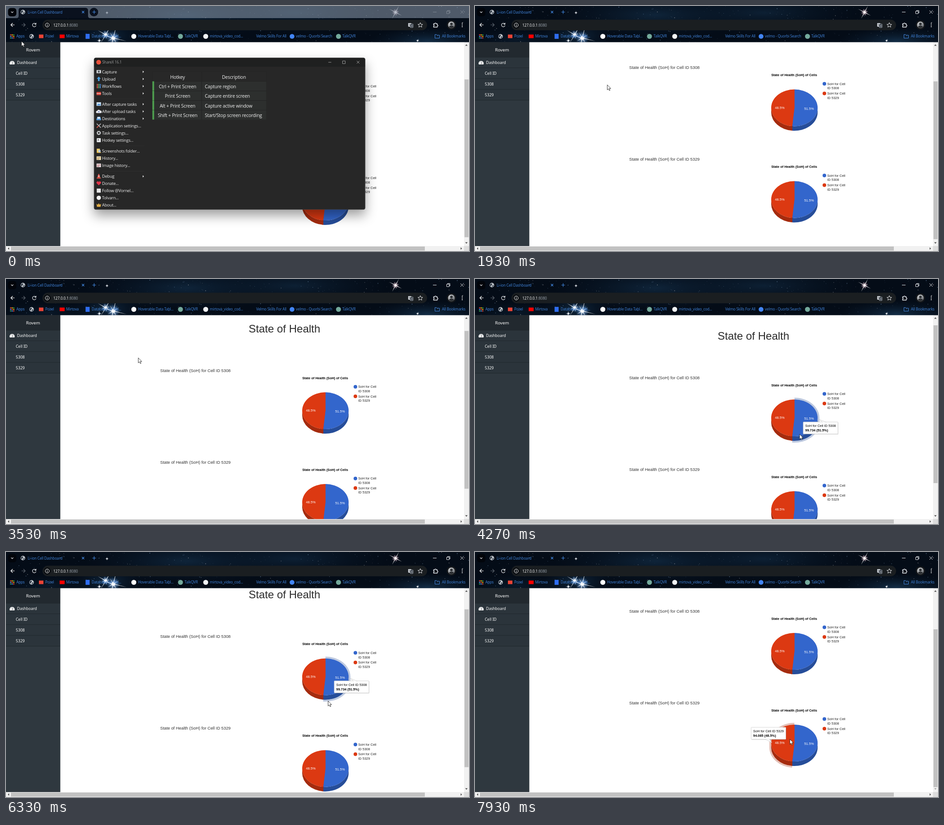
Write an HTML page that moves like this. It is 1027x545 px and loops after 8 s.

```html
<!DOCTYPE html>
<html lang="en">
<head>
<meta charset="utf-8">
<title>Li-ion Cell Dashboard</title>
<style>
html, body { margin: 0; width: 100%; height: 100%; overflow: hidden; background: #fff; }
svg { display: block; width: 100%; height: 100%; }
text { white-space: pre; }
.ui { font-family: "Open Sans", "Noto Sans", sans-serif; letter-spacing: -.02em; }
.nav { font-family: "Noto Sans", sans-serif; font-weight: 500; fill: #fff; }
.doc { font-family: "Liberation Sans", Arial, sans-serif; fill: #222; }
.mid { text-anchor: middle; }
.bold { font-weight: bold; }
.line { fill: none; stroke: #e8eaed; stroke-width: 1.2; }
#win { filter: drop-shadow(0 13px 13px rgba(0,0,0,.38)); }
</style>
</head>
<body>
<svg id="stage" viewBox="0 0 1027 545" preserveAspectRatio="none"></svg>
<script>
const rect = (x, y, w, h, fill, more = "") =>
  `<rect x="${x}" y="${y}" width="${w}" height="${h}" fill="${fill}" ${more}/>`;
const disc = (x, y, r, fill, more = "") =>
  `<circle cx="${x}" cy="${y}" r="${r}" fill="${fill}" ${more}/>`;
const path = (d, fill, more = "") => `<path d="${d}" fill="${fill}" ${more}/>`;
const line = (d, more = "") => `<path class="line" d="${d}" ${more}/>`;
// y is the middle of the capitals
const text = (x, y, s, size, cls, more = "") =>
  `<text x="${x}" y="${y}" dy=".36em" font-size="${size}" class="${cls}" ${more}>${s}</text>`;
const at = (x, y, s) => `<g transform="translate(${x} ${y})">${s}</g>`;

let seed = 11;
const rand = () => (seed = (seed * 16807) % 2147483647) / 2147483647;

function sky() {
  let s = rect(0, 0, 1027, 81, "#040c17");
  for (const [x, y, rx, ry, o] of [[400, 20, 230, 50, .6], [640, 15, 210, 45, .5],
    [935, 78, 130, 30, .8], [225, 66, 80, 34, .7], [90, 75, 110, 25, .3]])
    s += `<ellipse cx="${x}" cy="${y}" rx="${rx}" ry="${ry}" fill="url(#haze)" opacity="${o}"/>`;
  for (let i = 0; i < 420; i++) {
    const r = .3 + .6 * rand() ** 3;
    s += disc((rand() * 1027).toFixed(1), (rand() * 81).toFixed(1), r.toFixed(2),
      rand() < .6 ? "#8fb2d8" : "#d6cfcf", `opacity="${(.25 + .55 * rand()).toFixed(2)}"`);
  }
  const flare = (x, y, r, glow, turn) => {
    let rays = "";
    for (let i = 0; i < 8; i++) {
      const len = r * (i % 2 ? .5 : 1);
      rays += path(`M-.8 0L0 ${-len} .8 0Z`, "#fff", `transform="rotate(${turn + i * 45})"`);
    }
    return at(x, y, disc(0, 0, r * .5, `url(#${glow})`) + rays + disc(0, 0, r * .13, "#fff"));
  };
  return s + flare(238, 71, 30, "cold", 14) + flare(221, 64, 20, "cold", 30) +
    flare(864, 14, 16, "warm", 28) + flare(224, 15, 4, "cold", 0) +
    flare(207, 77, 6, "cold", 0) + flare(913, 77, 4, "cold", 20);
}

const globe = (x, y) => at(x, y, disc(0, 0, 5, "#c6cbd1") +
  path("M-4-2Q0-5 1-2L-1 0-2 3Q-5 1-4-2ZM2 0L4 0 2 4 0 3Z", "#27313d"));
const BLUE = "#4287e0";

function browser() {
  const f = `fill="${BLUE}"`;
  const mark = (x, s) => text(x, 67.5, s, 8.1, "ui", f);
  let apps = "";
  for (let i = 0; i < 9; i++)
    apps += rect(9 + i % 3 * 3.5, 63 + (i / 3 | 0) * 3.5, 2.4, 2.4,
      ["#ea4335", "#fbbc04", "#34a853", "#4c92ec"][i % 4]);
  return `<g id="idle">${rect(0, 0, 1027, 27, "#8593a4", 'opacity=".58"')}
    ${path("M23 27Q28 27 28 22V9Q28 4 33 4H176Q182 4 182 10V22Q182 27 187 27Z", "#0a111e")}
    ${disc(195, 13.5, 9.5, "#0a111e")}</g>` +
    rect(4.5, 4.5, 18.5, 18.5, "#02050b", 'rx="6"') + line("M11.3 12.3L13.8 14.8 16.3 12.3") +
    globe(37.5, 13.5) + text(48, 13.8, "Li-ion Cell Dashboard", 8.1, "ui", f) +
    line("M168.5 11L173.5 16M173.5 11L168.5 16M191.5 13.5H199.5M195.5 9.5V17.5", `style="stroke:${BLUE}"`) +
    `<g id="controls">${line("M947 13.5H955M977.5 11.5H983V17H977.5ZM979.5 11.5V10H984.7V15.3H983M1008 10L1015 17M1015 10L1008 17",
      'style="stroke-width:1"')}</g>` +
    line("M19 42H11M14.8 38L10.8 42 14.8 46", 'style="stroke:#fff"') +
    line("M34.5 42H42.5M38.7 38L42.7 42 38.7 46", 'style="stroke:#5d656f"') +
    line("M66 40A4 4 0 1 0 66.6 43.3M66.6 37.5V40.6H63.5") +
    rect(81, 30.5, 853, 23.5, "#1a1e21", 'rx="11.7"') +
    disc(91.5, 42.3, 8, "#0c0f13") + disc(91.5, 42.3, 4.4, "none", 'stroke="#fff"') +
    line("M91.5 41.8V44.8M91.5 39.7V40.7") +
    text(105, 42.5, '127.0.0.1<tspan fill="#9aa3ad">:8080</tspan>', 8.4, "ui", 'fill="#fff"') +
    rect(892, 38, 7, 8, "#c9ced4", 'rx="1"') + rect(896.5, 40, 6.5, 8, "#343c47", 'rx="1" stroke="#c9ced4" stroke-width=".7"') +
    text(895.4, 42, "G", 5.5, "ui mid", 'fill="#222"') + text(900, 44, "文", 4.5, "ui mid", 'fill="#fff"') +
    line("M919 37L920.5 40.6 924.3 40.9 921.4 43.4 922.3 47.1 919 45.1 915.7 47.1 916.6 43.4 913.7 40.9 917.5 40.6Z", 'style="stroke-width:1"') +
    line("M948.5 39.5H951A1.6 1.6 0 0 1 954.2 39.5H956.5V42A1.6 1.6 0 0 1 956.5 45.2V47H948.5V44.7A1.3 1.3 0 0 0 948.5 42Z", 'style="stroke-width:1.4"') +
    disc(988, 42, 10.5, "#15181b") + disc(988, 42, 7.5, "url(#photo)") + disc(988, 40, 2.8, "#2b2e31") +
    path("M982.5 46.5Q984 43.5 988 43.5T993.5 46.5Q988 51.5 982.5 46.5Z", "#2b2e31") +
    disc(1012, 38.5, 1.1, "#fff") + disc(1012, 42.3, 1.1, "#fff") + disc(1012, 46.1, 1.1, "#fff") +
    apps + mark(23, "Apps") + globe(56.7, 67.5) +
    rect(73, 63.5, 10, 8, "#ea4335") + mark(87, "Pozel") +
    rect(119, 63.5, 11, 8, "#f00") + mark(133.5, "Mirtova") +
    rect(176.5, 62, 9, 11, "#2f6df0") + mark(190, "Database on We...") +
    disc(283.5, 67.5, 5.5, "#fff") + mark(293, "Hoverable Data Tabl...") +
    disc(387, 67.5, 5.5, "#74aa9c") + mark(396, "TalkQVR") +
    disc(443, 67.5, 5.5, "#f2f4f6") + mark(452, "mirtova_video_cod...") +
    mark(555, "Velmo Skills For All") +
    disc(634.5, 67.5, 5.3, "#4285f4") + mark(643, "velmo - Quorbi Search") +
    disc(737.5, 67.5, 5.5, "#74aa9c") + mark(746, "TalkQVR") +
    line("M951.5 63.5H955L956.3 65H961.5V71.5H951.5Z", `style="stroke:${BLUE};stroke-width:1"`) + mark(967, "All Bookmarks");
}

function sidebar() {
  let s = rect(0, 80.5, 121, 453.5, "#2f383f") + rect(0, 80.5, 121, 33.5, "#22292f") +
    rect(0, 114, 121, 96, "#2b343b");
  for (const y of [113.5, 137, 161, 185, 209]) s += rect(0, y, 121, 1, "#20282d");
  return s + text(60, 97.5, "Rovem", 9.7, "nav mid") +
    path("M8.5 130A5.6 5.6 0 1 1 18.7 130Z", "#fff") +
    path("M13.6 129.5L15.5 124M10 127H11.2M11 124L12 124.8M13.6 122.3V123.5", "none", 'stroke="#2b343b" stroke-width=".9"') +
    text(24.5, 126, "Dashboard", 8.5, "nav") + text(21.7, 149.5, "Cell ID", 8.6, "nav") +
    text(21.7, 173.5, "5308", 8.7, "nav") + text(21.7, 197.5, "5329", 8.7, "nav");
}

const FACE = "A51.5 41 0 0", RING = "A55.5 45 0 0";
const slices = [
  { id: 5308, fill: "#3366cc", side: "#264d99", edge: 760, rim: 764, cw: 1,
    label: 741, ly: 222.5, value: "99.734 (51.5%)", box: [728, 230], tail: "M771 230.5L763.5 224.5 779 230.5" },
  { id: 5329, fill: "#dc3912", side: "#a52b0e", edge: 657, rim: 653, cw: 0,
    label: 676, ly: 220.3, value: "94.085 (48.5%)", box: [612.5, 186], tail: "M644 212.5L658.5 220 653 212.5" }
];

function chart(id) {
  let s = text(342, 131.4, `State of Health (SoH) for Cell ID ${id}`, 9.36, "doc", 'style="fill:#333"') +
    text(708, 148.2, "State of Health (SoH) of Cells", 7.35, "doc bold mid", 'style="fill:#000"') +
    // keeps the page from showing through the seam
    `<ellipse cx="708.5" cy="221" rx="51" ry="40.5" fill="#dc3912"/>` + rect(701, 255, 5, 16.5, "#a52b0e");
  slices.forEach((p, i) => {
    const y = 167.6 + 21.4 * i;
    s += disc(775, y, 4, p.fill) + text(781.3, y, "SoH for Cell", 7.45, "doc") +
      text(781.3, y + 9.6, `ID ${p.id}`, 7.45, "doc") +
      path(`M${p.edge} 221${FACE} ${p.cw} 703.65 261.8V271.8${FACE} ${1 - p.cw} ${p.edge} 231Z`, p.side) +
      path(`M708.5 221V180${FACE} ${p.cw} ${p.edge} 221${FACE} ${p.cw} 703.65 261.8Z`, p.fill) +
      text(p.label, p.ly, p.cw ? "51.5%" : "48.5%", 7.5, "doc mid", 'style="fill:#fff"');
  });
  return s;
}

function hover(p, i) {
  const [x, y] = p.box, back = 1 - p.cw;
  return `<g id="hover${i}">` +
    path(`M708.5 176${RING} ${p.cw} ${p.rim} 221V231${RING} ${p.cw} 703.3 275.8L703.65 271.8${FACE} ${back} ${p.edge} 231V221${FACE} ${back} 708.5 180Z`, p.side, 'opacity=".3"') +
    rect(x + 1, y + 1, 77, 27, "#000", 'opacity=".12" rx="1"') +
    rect(x, y, 77, 26.7, "#fff", 'stroke="#ccc" stroke-width=".8" rx="1"') +
    path(p.tail, "#fff", 'stroke="#ccc" stroke-width=".8"') +
    text(x + 4.6, y + 8.7, `SoH for Cell ID ${p.id}`, 7.4, "doc", 'style="fill:#000"') +
    text(x + 4.6, y + 18.2, p.value, 7.4, "doc bold", 'style="fill:#000"') + "</g>";
}

function page() {
  return rect(120.5, 80.5, 896, 453.5, "#fff") +
    `<g clip-path="url(#view)"><g id="scroll">
    ${text(617.7, 38.2, "State of Health", 24, "doc mid", 'style="fill:#2b2b2b"')}
    ${chart(5308)}${at(0, 204, chart(5329))}${slices.map(hover).join("")}</g></g>` +
    rect(1016, 80.5, 11, 464.5, "#f1f1f1") + rect(0, 534, 1016, 11, "#f1f1f1") + rect(1016, 534, 11, 11, "#dcdcdc") +
    rect(1017, 172, 9, 351, "#c1c1c1", 'id="thumb"') + rect(11, 535, 918, 9, "#c1c1c1") +
    path("M1018.5 88.5L1021.3 85.3 1024 88.5ZM7 536.8L4 539.5 7 542.2ZM1008.5 536.8L1011.5 539.5 1008.5 542.2Z", "#505050") +
    path("M1018.5 525.5L1021.3 528.7 1024 525.5Z", "#505050", 'id="down"');
}

function shareWindow() {
  const grid = [0, 1, 2, 3, 4, 5, 6, 7, 8].map(i =>
    rect(-4.5 + i % 3 * 3.3, -4.5 + (i / 3 | 0) * 3.3, 2.5, 2.5, ["#e2574c", "#58b368", "#4a90d9"][i % 3])).join("");
  const card = (a, b) => rect(-5, -4, 10, 8, a) + rect(-4, -1.5, 8, 1.4, b) + rect(-4, 1.3, 5, 1.4, b);
  const menu = [
    [146.3, "Capture", rect(-5, -3.5, 10, 7, "#d3d6d9") + disc(0, 0, 2.2, "#50565c"), 1],
    [162.3, "Upload", path("M0-5L4.5 0H1.8V5H-1.8V0H-4.5Z", "#4a9fe0"), 1],
    [178.4, "Workflows", grid, 1],
    [194.5, "Tools", rect(-5, -3, 10, 7, "#d9463c", 'rx="1"') + rect(-5, 0, 10, 1, "#eee"), 1],
    [218.4, "After capture tasks", rect(-5, -4, 10, 8, "#cfe4f5") + path("M-4 3L-1-1 1 1 3-1 4 3Z", "#4a90d9"), 1],
    [234.5, "After upload tasks", path("M-4 4A2.5 2.5 0 0 1-3.5-1 3.6 3.6 0 0 1 3-1.6 2.8 2.8 0 0 1 4 4Z", "#e6e8ee") + path("M0-1L2 2H-2Z", "#6a7fc0"), 1],
    [250.5, "Destinations", path("M-3-4H3L5 1V4H-5V1Z", "#5a9bd8") + rect(-3, -3, 6, 3.5, "#e9eff5"), 1],
    [266.6, "Application settings...", path("M-4.5-4.5L4.5 4.5M4.5-4.5L0 0", "none", 'stroke="#c9ccd0" stroke-width="1.5"') + path("M0 0L-4.5 4.5", "none", 'stroke="#e2574c" stroke-width="1.8"')],
    [282.6, "Task settings...", disc(0, 0, 3, "none", 'stroke="#d0d3d6" stroke-width="1.8"') + disc(0, 0, 4.2, "none", 'stroke="#d0d3d6" stroke-width="1.3" stroke-dasharray="1.65"')],
    [298.7, "Hotkey settings...", rect(-4.5, -4.5, 9, 9, "#e4e6e8", 'rx="1"') + rect(-2, -2, 2, 3, "#666")],
    [322.7, "Screenshots folder...", rect(-4.5, -5, 7, 9, "#f2d06b") + rect(-1, -2, 5, 6, "#b6cbe0") + rect(-4, 3, 9, 1.5, "#d8a93a")],
    [338.8, "History...", card("#efe3bd", "#b58c4f")],
    [354.8, "Image history...", card("#eadfe0", "#b9747b")],
    [379, "Debug", path("M-1-5H1L3 3H4.5V5H-4.5V3H-3Z", "#e2574c") + rect(-2.2, -1, 4.4, 1.5, "#eee"), 1],
    [394.9, "Donate...", path("M0 4.5L-4.5 0A2.6 2.6 0 0 1 0-3.2 2.6 2.6 0 0 1 4.5 0Z", "#e0344a")],
    [411, "Follow @Vornel...", rect(-4.5, -4.5, 9, 9, "#e8e8e8")],
    [427, "Tolvarn...", disc(0, 0, 4.8, "#f2f2f2")],
    [443, "About...", path("M-5-3L-2.3-.5 0-4 2.3-.5 5-3 4 4H-4Z", "#e3ae45")]
  ];
  const keys = [["Ctrl + Print Screen", "Capture region"], ["Print Screen", "Capture entire screen"],
    ["Alt + Print Screen", "Capture active window"], ["Shift + Print Screen", "Start/Stop screen recording"]];
  const white = 'fill="#f0f0f0"';
  let s = rect(195.3, 115.3, 601.4, 337.4, "#272727", 'rx="4" stroke="#454545" stroke-width=".7"') +
    path("M195.7 135V119.5Q195.7 115.7 199.5 115.7H792.5Q796.3 115.7 796.3 119.5V135Z", "#1f2020") +
    disc(205.5, 125, 5.3, "#e8503a") + text(213.5, 125.4, "ShareX 16.1", 8.2, "ui", 'fill="#9a9a9a"') +
    line("M715 125.2H721.5M746.5 122.2H752.5V128.2H746.5ZM778 122L784 128M784 122L778 128", 'style="stroke:#aaa;stroke-width:.9"');
  for (const [y, name, icon, more] of menu)
    s += at(205.8, y - .3, icon) + text(213, y, name, 9.2, "ui", white) +
      (more ? path(`M303.3 ${y - 2.6}L306 ${y} 303.3 ${y + 2.6}Z`, "#eee") : "");
  for (const y of [206.5, 310.7, 367]) s += rect(213, y, 94, .6, "#343434");
  s += rect(324.5, 146, 253.5, 106.5, "#222") + rect(325, 146.5, 108.5, 20.5, "#282828") + rect(434.5, 146.5, 143, 20.5, "#282828") +
    text(380.5, 157.8, "Hotkey", 10.4, "ui mid", white) + text(505.5, 157.8, "Description", 10.4, "ui mid", white);
  keys.forEach(([key, what], i) => {
    const y = 168 + 21.4 * i;
    s += rect(324.7, y - .5, 3.9, 21, "#4f9f50") + rect(329, y, 104.5, 20.5, "#2d2f2e") + rect(434.5, y, 143, 20.5, "#2d2f2e") +
      text(380.5, y + 11.3, key, 10.4, "ui mid", white) + text(441, y + 11.3, what, 10.4, "ui", white);
  });
  return `<g id="win">${s}</g>`;
}

const fade = (id, a, b) => `<radialGradient id="${id}"><stop stop-color="${a}"/><stop offset="1" stop-color="${b}" stop-opacity="0"/></radialGradient>`;
const $ = id => document.getElementById(id);
$("stage").innerHTML = `<defs>${fade("haze", "#163450", "#0a1c30")}${fade("cold", "#d2e9ff", "#2f6fc0")}${fade("warm", "#f3c9d2", "#6c4560")}
  <linearGradient id="photo" x2="1" y2="1"><stop stop-color="#d4d6d8"/><stop offset="1" stop-color="#60656a"/></linearGradient>
  <clipPath id="view">${rect(120.5, 80.5, 896, 453.5, "#000")}</clipPath></defs>` +
  sky() + browser() + sidebar() + page() + shareWindow() +
  path("M.4.4V11.6L3 9.2 4.8 13.1 6.6 12.3 4.9 8.5H8.2Z", "#fff", 'id="pointer" stroke="#111" stroke-width=".8"');

const pointerKeys = [[0, 34, 78], [67, 70, 72], [133, 250, 82], [200, 470, 122], [267, 605, 152], [333, 646, 161],
  [400, 646, 161], [600, 690, 146], [733, 712, 130], [867, 717, 124], [1000, 718, 123], [1067, 724, 123],
  [1133, 670, 128], [1200, 545, 141], [1267, 404, 157], [1333, 320, 171], [1400, 293, 175], [3933, 293, 175],
  [4000, 305, 180], [4133, 500, 250], [4200, 640, 318], [4267, 720, 345], [4400, 724, 346], [4533, 702, 336],
  [4667, 689, 326], [4800, 683, 321], [4867, 684, 322], [5200, 684, 322], [5600, 714, 331],
  [7733, 714, 331], [7800, 712, 345], [7867, 704, 390], [7933, 698, 416]];
const scrollKeys = [[0, 11], [1867, 11], [2000, 0], [2867, 0], [2933, .6], [3067, 7], [3200, 22], [3333, 43], [3533, 72],
  [3633, 82], [3733, 88], [6133, 88], [6200, 80], [6333, 56.7], [6533, 26], [6733, 7], [6933, 0]];
const shrinkKeys = [[933, 0], [1000, .3], [1067, 1], [1133, 1.3]];
// from time, slice, chart
const hovers = [[7860, 1, 1], [7390, -1, 0], [5460, 0, 0], [4530, 1, 0], [4260, 0, 0], [0, -1, 0]];

function mix(keys, t) {
  const i = keys.findIndex(k => k[0] > t);
  if (i < 1) return keys[i < 0 ? keys.length - 1 : 0].slice(1);
  const a = keys[i - 1], b = keys[i], p = (t - a[0]) / (b[0] - a[0]);
  return a.slice(1).map((v, j) => v + (b[j + 1] - v) * p);
}
const show = (id, on) => $(id).style.display = on ? "" : "none";
const move = (id, x, y, more = "") => $(id).setAttribute("transform", `translate(${x} ${y})${more}`);

function draw(now) {
  const t = Math.min(119, Math.floor((now % 8000 + 4) * .015)) / .015;
  const [x, y] = mix(pointerKeys, t), [top] = mix(scrollKeys, t), [m] = mix(shrinkKeys, t);
  move("pointer", x, y);
  move("scroll", 0, top);
  move("thumb", 0, -.784 * top);
  $("down").setAttribute("fill", (t > 1990 && t < 2950) || t > 7390 ? "#a3a3a3" : "#505050");

  const active = t > 990;
  show("idle", !active);
  $("controls").setAttribute("opacity", active ? 1 : .3);
  show("win", t < 1190);
  move("win", 496 + 25 * m, 284 + 61 * m, ` scale(${1 - .234 * m}) translate(-496 -284)`);
  $("win").setAttribute("opacity", t > 1100 ? .35 : 1);

  const [, slice, row] = hovers.find(h => t >= h[0]);
  for (const i of [0, 1]) {
    show("hover" + i, slice === i);
    move("hover" + i, 0, 204 * row);
  }
}

const start = performance.now();
function loop() {
  draw(performance.now() - start);
  requestAnimationFrame(loop);
}
draw(0);
requestAnimationFrame(loop);
</script>
</body>
</html>
```
